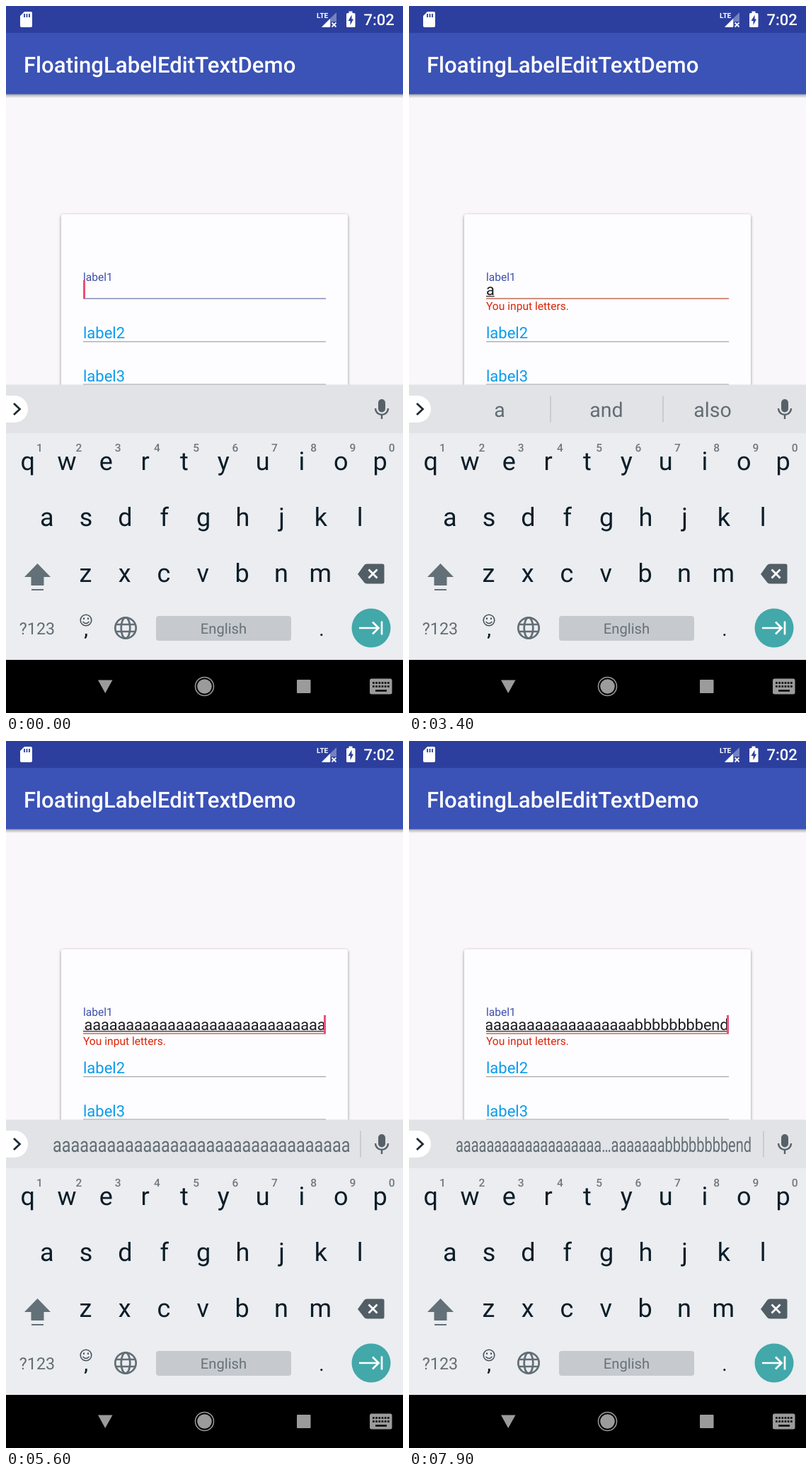
Recreate the animation shown at these times as an HTML page. Size 561 by 998 pixels, loop 8000 ms.

```html
<!DOCTYPE html>
<html lang="en">
<head>
<meta charset="utf-8">
<title>Floating label demo</title>
<style>
  html, body { margin: 0; width: 100%; height: 100%; overflow: hidden; background: #000; }
  svg { display: block; width: 100vw; height: 100vh; }
  text { font-family: Roboto, sans-serif; text-rendering: geometricPrecision; white-space: pre; }
  .mid { text-anchor: middle; }
  .key { font-size: 36px; fill: #0b1d28; }
  .hint { font-size: 15.5px; font-weight: 500; fill: #71787c; }
  .label { font-size: 22px; fill: #0a9cec; }
  .small { font-size: 15.6px; }
  .word { font-size: 28.5px; fill: #626d74; }
  #input { font-size: 21.8px; letter-spacing: -.1px; fill: #1c1c20; }
</style>
</head>
<body>
<svg viewBox="0 0 561 998">
  <defs>
    <clipPath id="fieldClip"><rect x="109" y="380" width="343" height="36"/></clipPath>
    <filter id="soft" x="-10%" y="-10%" width="120%" height="120%"><feGaussianBlur stdDeviation="2"/></filter>
    <linearGradient id="drop" x2="0" y2="1">
      <stop stop-opacity=".36"/><stop offset="1" stop-opacity="0"/>
    </linearGradient>
  </defs>

  <rect width="561" height="998" fill="#f9f7fa"/>
  <rect y="124" width="561" height="6" fill="url(#drop)"/>
  <rect y="38" width="561" height="86.500" fill="#3b52b6"/>
  <rect width="561" height="38" fill="#2c3f9e"/>
  <text x="25" y="94" font-size="31.150" font-weight="500" fill="#fff">FloatingLabelEditTextDemo</text>

  <!-- status bar -->
  <g fill="#fff">
    <path d="M26 8H35a2 2 0 0 1 2 2V28a2 2 0 0 1-2 2H22a2 2 0 0 1-2-2V14Z"/>
    <path d="M26 11v5M29.500 11v5M33 11v5" stroke="#2c3f9e" stroke-width="1.800"/>
    <text x="439" y="17" font-size="10" font-weight="700">LTE</text>
    <path d="M467 9V22H459V29H446Z" opacity=".35"/>
    <path d="M458 18V30H446Z"/>
    <path d="M460.500 23.500l6 6m0-6l-6 6" stroke="#fff" stroke-width="1.800"/>
    <path d="M484.500 10V7.500h5V10H492a1.500 1.500 0 0 1 1.500 1.500V28.500A1.500 1.500 0 0 1 492 30H482.500a1.500 1.500 0 0 1-1.500-1.500V11.500a1.500 1.500 0 0 1 1.500-1.500Z"/>
    <path d="M488.500 12.500L483.500 21H486.500V27L491 18.500H488.500Z" fill="#2c3f9e"/>
    <text x="505.500" y="27" font-size="22" font-weight="500">7:02</text>
  </g>

  <!-- form card -->
  <rect x="78" y="295.500" width="405" height="260" rx="3" opacity=".42" filter="url(#soft)"/>
  <rect x="78" y="294" width="405" height="260" rx="3" fill="#fdfcfe"/>
  <text class="small" x="109" y="388" fill="#3d4fad">label1</text>
  <rect id="rule" x="109" y="412" width="343" height="2"/>
  <g clip-path="url(#fieldClip)">
    <text id="input" y="407.700"></text>
    <rect id="compose" y="409" height="1.500" fill="#4a4648"/>
  </g>
  <rect id="cursor" y="387" width="3" height="26" fill="#ee4f78"/>
  <text id="error" class="small" x="109" y="429" fill="#dc2408">You input letters.</text>
  <text class="label" x="109" y="469">label2</text>
  <rect x="109" y="473" width="343" height="1.500" fill="#b3b2b6"/>
  <text class="label" x="109" y="530">label3</text>
  <rect x="109" y="533.500" width="343" height="1.500" fill="#a9a8ac"/>

  <!-- keyboard -->
  <rect y="534.500" width="561" height="69" fill="#e1e3e6"/>
  <rect y="603" width="561" height="320" fill="#ebedf0"/>
  <path d="M0 550H12a19 19 0 0 1 0 38H0Z" fill="#fff"/>
  <path d="M11 561l8.500 8-8.500 8" fill="none" stroke="#1e2b33" stroke-width="2.800"/>
  <g stroke="#566169" fill="none" stroke-width="2.400">
    <rect x="527.200" y="556.200" width="7.600" height="16" rx="3.800" fill="#566169"/>
    <path d="M522 568a9 9 0 0 0 18 0M531 577v6"/>
  </g>
  <g id="dividers" fill="#bfc3c6"></g>
  <g id="words"></g>
  <g id="keys"></g>

  <path d="M44.500 787L63 806H53.500V818H35.500V806H26Z" fill="#647078"/>
  <rect x="36" y="823" width="17" height="2" fill="#647078"/>
  <path d="M497 802L506 789.500Q507.500 787.500 510 787.500H532a2.500 2.500 0 0 1 2.500 2.500V813a2.500 2.500 0 0 1-2.500 2.500H510Q507.500 815.500 506 813.500Z" fill="#525e66"/>
  <path d="M512.500 795.500l12 12m0-12l-12 12" stroke="#fff" stroke-width="2.800"/>

  <text class="mid" x="44" y="887" font-size="23.300" fill="#626d74">?123</text>
  <g fill="none" stroke="#48545c" stroke-width="1.600">
    <circle cx="113" cy="867" r="7.800"/>
    <path d="M108.500 869q4.500 5 9 0"/>
    <path d="M110 863.500v2.600M116 863.500v2.600" stroke-width="2"/>
  </g>
  <text class="mid" x="113" y="889" font-size="26" font-weight="500" fill="#0b1d28">,</text>
  <g fill="none" stroke="#626e76" stroke-width="2.700">
    <circle cx="169" cy="878" r="14.700"/>
    <ellipse cx="169" cy="878" rx="6.300" ry="14.700"/>
    <path d="M155.500 873h27M155.500 883h27"/>
  </g>
  <rect x="212" y="861" width="191" height="35" rx="4" fill="#c6cacf"/>
  <text class="mid" x="307.500" y="885.500" font-size="20.200" fill="#677178">English</text>
  <text class="mid" x="446" y="889" font-size="28" fill="#0b1d28">.</text>
  <circle cx="516" cy="878" r="27.500" fill="#42a8aa"/>
  <path d="M499 878H526M518 869.500l8.500 8.500-8.500 8.500M531 868.500v19" fill="none" stroke="#fff" stroke-width="2.700"/>

  <!-- navigation bar -->
  <rect y="923" width="561" height="75"/>
  <g fill="#9b9b9b">
    <path d="M130 951.500H150.500L140.200 970Z"/>
    <circle cx="280.500" cy="960.500" r="10.300"/>
    <circle cx="280.500" cy="960.500" r="13" fill="none" stroke="#9b9b9b" stroke-width="1.500"/>
    <rect x="411" y="951" width="19.500" height="19" rx="1"/>
    <rect x="514" y="949.500" width="31.500" height="22" rx="2.500"/>
    <path d="M518 955.500H542M518 960.500H542" stroke="#000" stroke-width="2.600" stroke-dasharray="2.700 1.500"/>
    <path d="M522 966.500H538" stroke="#000" stroke-width="2.500"/>
  </g>
</svg>
<script>
const LOOP = 8000, BLINK = 500;
const LEFT = 109, RIGHT = 452;
const FIT = 420.5, MIN_SCALE = 0.7;
const PITCH = 55.3;
const $ = id => document.getElementById(id);

function add(parent, tag, attrs, content = '') {
  const el = document.createElementNS('http://www.w3.org/2000/svg', tag);
  for (const name in attrs) el.setAttribute(name, attrs[name]);
  el.textContent = content;
  return parent.appendChild(el);
}

function addRow(chars, x, y, type = 'key') {
  [...chars].forEach((c, i) =>
    add($('keys'), 'text', { class: type + ' mid', x: x + i * PITCH, y }, c));
}
addRow('1234567890', 47.5, 629, 'hint');
addRow('qwertyuiop', 30.8, 655);
addRow('asdfghjkl', 57.8, 734);
addRow('zxcvbnm', 112.4, 812.5);

const dividers = [200, 359, 501].map(x =>
  add($('dividers'), 'rect', { x: x - 0.7, y: 550.5, width: 1.4, height: 37 }));
const slots = [128, 279, 429].map(x =>
  add($('words'), 'text', { class: 'word mid', x, y: 580 }));
const longWord = add($('words'), 'text', { class: 'word' });

// Key strokes: single taps, a held key, then taps again.
const strokes = [[2900, 'a'], [3800, 'a'], [4200, 'a']];
for (let t = 4700; t <= 5600; t += 100) strokes.push([t, 'aaa']);
strokes.push([5800, 'aa']);
for (const t of [6100, 6300, 6400, 6600, 6800, 6900, 7100, 7200]) strokes.push([t, 'b']);
strokes.push([7600, 'e'], [7800, 'n'], [7900, 'd']);

const choices = {
  a: ['a', 'and', 'also'],
  aa: ['aa', 'as', 'AA'],
  aaa: ['“aaa”', 'aaa', 'AAA']
};

function show(el, on) { el.setAttribute('visibility', on ? 'visible' : 'hidden'); }

function drawSuggestions(typed) {
  const three = choices[typed];
  const single = typed && !three;
  slots.forEach((el, i) => el.textContent = three ? three[i] : '');
  dividers.forEach((el, i) => show(el, i < 2 ? three : single));
  longWord.textContent = single ? typed : '';
  if (!single) return;

  // Condense a long word, then shorten it in the middle.
  const width = longWord.getComputedTextLength();
  let scale = Math.min(1, FIT / width);
  if (scale < MIN_SCALE) {
    scale = MIN_SCALE;
    longWord.textContent = typed.slice(0, 19) + '…' + typed.slice(-18);
  }
  const x = scale < 1 ? 66 : Math.max(66, 279 - width / 2);
  longWord.setAttribute('transform', `translate(${x} 580) scale(${scale} 1)`);
}

function drawField(typed) {
  const input = $('input');
  input.textContent = typed;
  const width = typed ? input.getComputedTextLength() : 0;
  const x = Math.min(LEFT, RIGHT - 0.5 - width);
  input.setAttribute('x', x);
  $('compose').setAttribute('x', x);
  $('compose').setAttribute('width', width);
  $('cursor').setAttribute('x', Math.min(LEFT + width, RIGHT - 3));
  $('rule').setAttribute('fill', typed ? '#d28f7f' : '#a3a7cc');
  show($('error'), typed);
}

let shown = null;
function render(t) {
  const past = strokes.filter(s => s[0] <= t);
  const typed = past.map(s => s[1]).join('');
  if (typed !== shown) {
    drawField(typed);
    drawSuggestions(typed);
    shown = typed;
  }
  const blinkStart = past.length ? past[past.length - 1][0] : -300;
  show($('cursor'), (t - blinkStart) % (2 * BLINK) < BLINK);
}

function tick() {
  render(performance.now() % LOOP);
  requestAnimationFrame(tick);
}
tick();
</script>
</body>
</html>
```
